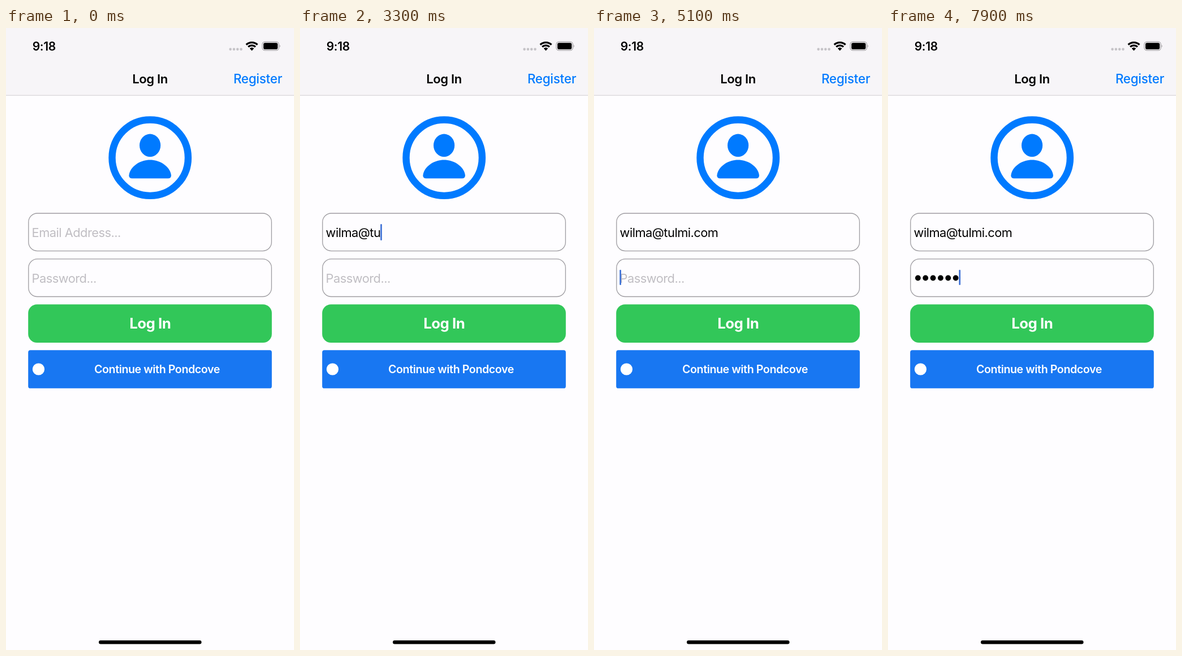
Write an HTML page that moves like this. It is 509x1101 px and loops after 8 s.

```html
<!DOCTYPE html>
<html lang="en">
<head>
<meta charset="utf-8">
<title>Log In</title>
<style>
  html, body { margin: 0; width: 100%; height: 100%; overflow: hidden; background: #fefdff; }
  svg { display: block; width: 100vw; height: 100vh; }
  text { font-family: Inter, "Open Sans", sans-serif; white-space: pre; }
  .field { fill: none; stroke: #9e9ca1; stroke-width: 1.3; }
  .input { font-size: 21.8px; letter-spacing: -.5px; }
  .hint { fill: #c0bec3; }
  .mid { text-anchor: middle; }
  .semi { font-weight: 600; }
</style>
</head>
<body>
<svg viewBox="0 0 509 1101">
  <defs>
    <clipPath id="fan"><path d="M434.5 40.2 L418 22.5 H451Z"/></clipPath>
  </defs>
  <rect width="509" height="1101" fill="#fefdff"/>

  <!-- status and navigation bars -->
  <rect width="509" height="119" fill="#f7f5f8"/>
  <rect y="118.6" width="509" height="1.3" fill="#d9d7da"/>
  <text class="mid semi" x="67.3" y="40" font-size="21" letter-spacing="-.3">9:18</text>
  <path d="M396.6 37.6h20" stroke="#c5c3c7" stroke-width="4.6" stroke-linecap="round" stroke-dasharray="0 6.3"/>
  <g clip-path="url(#fan)" fill="none" stroke="#000" stroke-width="3.3">
    <circle cx="434.5" cy="39.8" r="14.2"/>
    <circle cx="434.5" cy="39.8" r="9"/>
    <circle cx="434.5" cy="39.8" r="2.6" stroke-width="5.2"/>
  </g>
  <rect x="453" y="24.3" width="29.2" height="15.4" rx="4.6" fill="none" stroke="#a5a3a6" stroke-width="1.3"/>
  <rect x="455" y="26.3" width="25.2" height="11.4" rx="2.8"/>
  <path d="M483.6 29.5q2.4 2.5 0 5z" fill="#a5a3a6"/>
  <text class="mid semi" x="254.5" y="98" font-size="22" letter-spacing="-.35">Log In</text>
  <text class="mid" x="445" y="98" font-size="22.3" font-weight="500" letter-spacing="-.2" fill="#007aff">Register</text>

  <!-- avatar -->
  <g fill="#007aff">
    <circle cx="254.7" cy="229.7" r="67.2" fill="none" stroke="#007aff" stroke-width="12.4"/>
    <ellipse cx="254.6" cy="207.8" rx="18.6" ry="20.2"/>
    <path d="M223 266.3Q217 266.3 217.4 260.5C219 246 236 233.5 254.6 233.5S290.200 246 291.900 260.500Q292.200 266.300 286.300 266.300Z"/>
  </g>

  <!-- form -->
  <rect class="field" x="39.800" y="328" width="429.500" height="66.600" rx="15.500"/>
  <rect class="field" x="39.800" y="408.900" width="429.500" height="66.600" rx="15.500"/>
  <text class="input hint" id="emailHint" x="45.600" y="370">Email Address...</text>
  <text class="input" id="email" x="45.600" y="370"></text>
  <text class="input hint" id="passHint" x="45.600" y="451">Password...</text>
  <g id="dots"></g>
  <rect id="caret" width="2.700" rx="1.300" fill="#3f72d6"/>

  <rect x="39.200" y="489.200" width="430.600" height="67.800" rx="15.600" fill="#32c759"/>
  <text class="mid" x="254.700" y="532" font-size="25.800" font-weight="700" letter-spacing="-.5" fill="#fff">Log In</text>
  <rect x="39.200" y="570.200" width="430.600" height="67.600" rx="3.900" fill="#1877f2"/>
  <circle cx="57.500" cy="604" r="10.600" fill="#fff"/>
  <text class="semi" x="156" y="611" font-size="19.600" letter-spacing="-.4" fill="#fff">Continue with Pondcove</text>

  <rect x="164" y="1084" width="181.500" height="6.400" rx="3.200"/>
</svg>
<script>
const $ = id => document.getElementById(id);
const LOOP = 8000, SWITCH = 4900, DOT_STEP = 13.35;
const address = "wilma@tulmi.com";
const emailKeys = [1400, 1600, 1800, 1900, 2400, 2800, 3100, 3300, 3500, 3600, 3800, 4000, 4200, 4300, 4400];
const passKeys = [6600, 6900, 7200, 7600, 7700, 7900];
// caret opacity from each moment on
const blink = [[0, 0], [800, .5], [900, 1], [4900, .33], [5000, .67], [5100, 1],
  [5600, .67], [5700, .33], [5800, 0], [6000, .5], [6100, 1]];

const typed = (keys, t) => keys.filter(k => k <= t).length;
const show = (el, on) => el.setAttribute("visibility", on ? "visible" : "hidden");

const dots = passKeys.map((_, i) => {
  const c = document.createElementNS("http://www.w3.org/2000/svg", "circle");
  c.setAttribute("cx", 52.9 + i * DOT_STEP);
  c.setAttribute("cy", 442.5);
  c.setAttribute("r", 4.9);
  return $("dots").appendChild(c);
});

function draw(t) {
  const letters = typed(emailKeys, t), hidden = typed(passKeys, t), inPass = t >= SWITCH;
  $("email").textContent = address.slice(0, letters);
  show($("emailHint"), !letters);
  show($("passHint"), !hidden);
  dots.forEach((d, i) => show(d, i < hidden));

  const width = inPass ? hidden * DOT_STEP : letters ? $("email").getComputedTextLength() : 0;
  const caret = $("caret");
  caret.setAttribute("x", 45.3 + width);
  caret.setAttribute("y", inPass ? 428 : 347);
  caret.setAttribute("height", inPass ? 27 : 29);
  caret.setAttribute("opacity", blink.findLast(([at]) => at <= t)[1]);
}

const start = performance.now();
function frame() {
  draw((performance.now() - start) % LOOP);
  requestAnimationFrame(frame);
}
frame();
</script>
</body>
</html>
```
